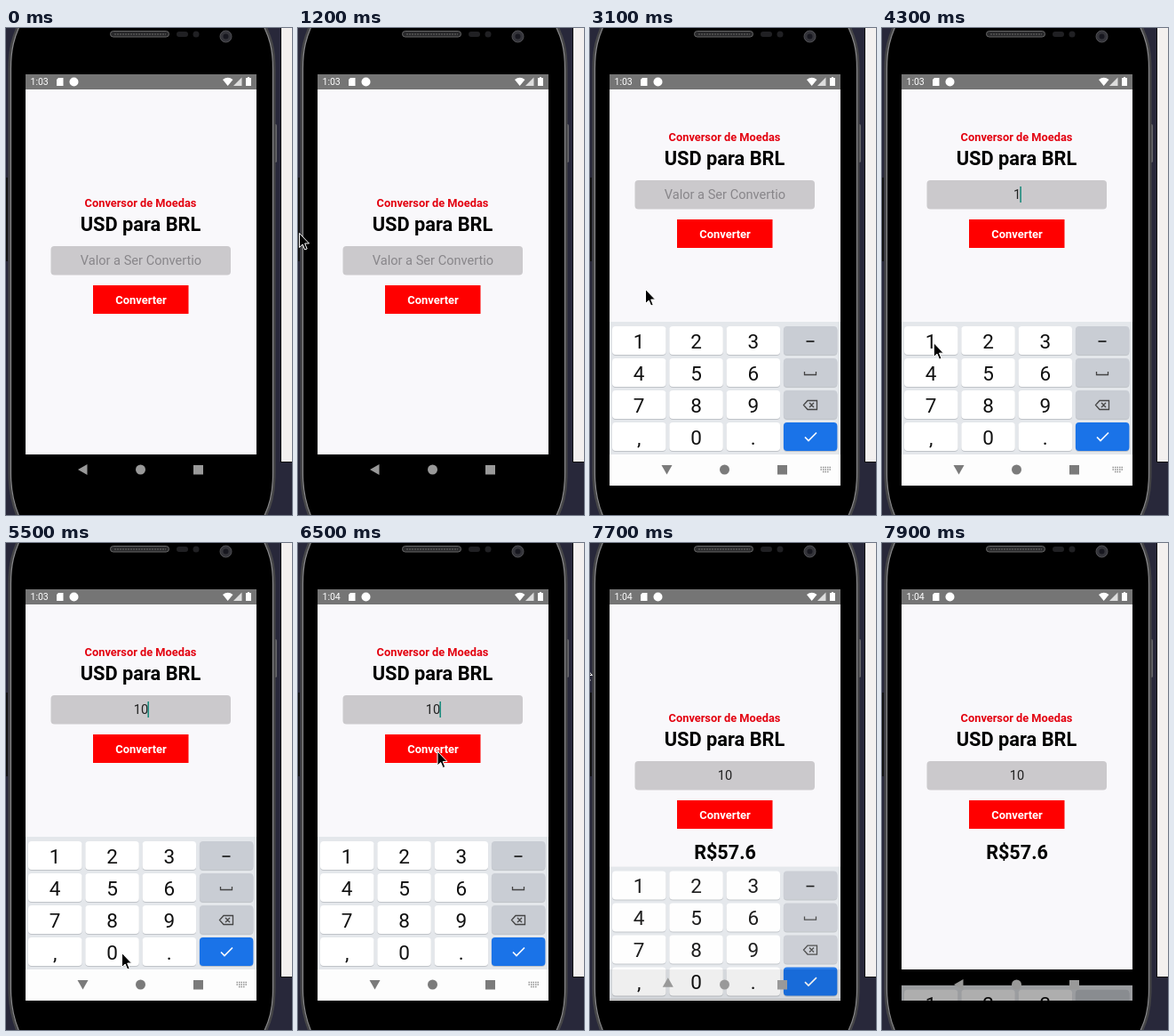
An HTML page for the animation above (8000 ms loop, 322 px wide and 547 px high).

```html
<!DOCTYPE html>
<html lang="pt">
<head>
<meta charset="utf-8">
<title>Conversor de Moedas</title>
<style>
html, body { margin: 0; width: 100%; height: 100%; overflow: hidden; background: #28283a; }
svg { display: block; width: 322px; height: 547px; font-family: Roboto, sans-serif; }
.mid text { text-anchor: middle; }
.bold { font-weight: 700; }
</style>
</head>
<body>
<svg viewBox="0 0 322 547">
  <defs>
    <clipPath id="screen"><rect x="22" y="52" width="260" height="462"/></clipPath>
    <path id="body" d="M18 -8C9 10 5.500 24 5.500 46V500C5.500 522 9 538 18 555H287C297 538 300.500 522 300.500 500V46C300.500 24 297 10 287 -8Z"/>
  </defs>

  <!-- desktop and phone -->
  <rect width="322" height="547" fill="#28283a"/>
  <rect x="309" width="13" height="488" fill="#111"/>
  <rect x="310" width="12" height="487" fill="#f3f0ef"/>
  <rect x="301" y="108" width="4" height="43" rx="1.5" fill="#66666a"/>
  <rect y="168" width="2" height="94" fill="#111"/>
  <use href="#body" fill="#000" stroke="#454547" stroke-width="6"/>
  <use href="#body" fill="#000" stroke="#88888a" stroke-width="1.200"/>
  <rect x="117.500" y="3.500" width="66" height="6.500" rx="3.200" fill="#29292b" stroke="#666"/>
  <path d="M122 7H180" stroke="#484848" stroke-width="2" stroke-dasharray="2 1"/>
  <rect x="192" y="4" width="13" height="6" rx="3" fill="#202023"/>
  <circle cx="214" cy="7" r="3.500" fill="#202023"/>
  <circle cx="247.500" cy="9.500" r="6.500" fill="#34343a" stroke="#505054"/>
  <circle cx="247.500" cy="9.500" r="3" fill="#17171f"/>

  <g clip-path="url(#screen)">
    <rect x="22" y="69" width="260" height="410" fill="#f9f8fb"/>
    <rect x="22" y="52" width="260" height="17" fill="#757575"/>
    <g fill="#fff">
      <text id="clock" x="27.500" y="64.300" font-size="10.500"></text>
      <path d="M59 56H64.500V65H57V58Z"/>
      <circle cx="76.500" cy="60.500" r="5"/>
      <path d="M244 58Q249.700 53.500 255.500 58L249.700 65Z"/>
      <path d="M265.500 55.500V65H256Z" fill="#ddd"/>
      <path d="M272 55H274V56H276V65H270V56H272Z"/>
    </g>

    <g id="form" class="mid">
      <text class="bold" x="151.500" y="200.800" font-size="12.800" fill="#e3000f">Conversor de Moedas</text>
      <text class="bold" x="151.500" y="227.700" font-size="21.800">USD para BRL</text>
      <rect x="50.500" y="245" width="202.500" height="32.500" rx="4" fill="#cbc9cc"/>
      <text id="value" x="152" y="266" font-size="14.600"></text>
      <path id="caret" d="M0 252V270" stroke="#128779" stroke-width="1.500"/>
      <g id="button">
        <rect x="98" y="289" width="107.500" height="32" fill="#f00"/>
        <text class="bold" x="152" y="310" font-size="12.900" fill="#fff">Converter</text>
      </g>
      <text id="result" class="bold" x="152" y="354.500" font-size="21.600">R$57.6</text>
    </g>

    <rect x="22" y="479" width="260" height="35"/>
    <g id="keyboard" class="mid">
      <rect x="22" y="330" width="260" height="149" fill="#e4e7eb"/>
      <rect x="22" y="479" width="260" height="35" fill="#fdfdfd"/>
      <g id="keys" font-size="22.500" fill="#111"></g>
      <g fill="none" stroke="#444" stroke-width="1.300">
        <path d="M243.500 352H252.500" stroke="#111" stroke-width="1.600"/>
        <path d="M241.500 386V389.500H254.500V386"/>
        <path d="M245 418.500H255.500V428.500H245L240.500 423.500ZM247 421L252 426M252 421L247 426"/>
        <path d="M242 459.500L246 463.500L255 454.500" stroke="#fff" stroke-width="1.700"/>
      </g>
    </g>
    <g id="nav">
      <path id="back" d="M-5.500 0L5 -6V6Z"/>
      <circle cx="151.500" cy="496" r="5.500"/>
      <rect x="211" y="491" width="11" height="10.500"/>
      <path id="switcher" d="M259.500 493.500H271.500M259.500 496H271.500M262 498.500H269" fill="none"
        stroke="#909090" stroke-width="1.500" stroke-dasharray="1.500 1"/>
    </g>
  </g>
  <path id="pointer" d="M0.500 0.500V16.500L4.200 13L6.700 19L9.200 18L6.700 12H11.500Z" fill="#000" stroke="#fff"/>
</svg>

<script>
const LOOP = 8000, STEP = 100;
const FOCUS = 2400, TYPE_1 = 3900, TYPE_0 = 5300, PRESS = 6900, RESULT = 7600;
const $ = id => document.getElementById(id);
const set = (id, attrs) => Object.entries(attrs).forEach(([k, v]) => $(id).setAttribute(k, v));
const ramp = (t, from, to) => Math.min(1, Math.max(0, (t - from) / (to - from)));
const smooth = p => p < 0.5 ? 4 * p ** 3 : 1 - 4 * (1 - p) ** 3;
const keys = {};

// number pad: three white columns and one function column
['123', '456', '789', ',0.'].forEach((row, r) => {
  [...row, ''].forEach((label, c) => {
    const x = 25 + c * 64.3, y = 335 + r * 36;
    const fill = label ? '#fff' : r < 3 ? '#c9cdd4' : '#1a73e8';
    $('keys').insertAdjacentHTML('beforeend',
      `<rect x="${x}" y="${y + 1}" width="60.500" height="32" rx="4" fill="#bfc3c8"/>
       <rect x="${x}" y="${y}" width="60.500" height="32" rx="4" fill="${fill}"/>
       <text x="${x + 30.2}" y="${y + 24.5}">${label}</text>`);
    if (label) keys[label] = $('keys').lastElementChild.previousElementSibling;
  });
});

// pointer glides, one after another
const glides = [
  { from: 1000, to: 1400, x: 106, y: 257 },
  { from: 2500, to: 2900, x: 62, y: 293 },
  { from: 3100, to: 3400, x: 53, y: 346 },
  { from: 4100, to: 4900, x: 130, y: 460 },
  { from: 5800, to: 6300, x: 156.5, y: 233.5 },
  { from: 7400, to: 7800, x: -20, y: 130 }
];

function pointerAt(t) {
  let x = -104, y = 203;
  for (const g of glides) {
    const p = smooth(ramp(t, g.from, g.to));
    x += (g.x - x) * p;
    y += (g.y - y) * p;
  }
  return [x, y];
}

function caretOn(t) {
  const since = t - (t < TYPE_1 ? FOCUS : t < TYPE_0 ? TYPE_1 : TYPE_0);
  return t >= FOCUS && t < PRESS && since % 1000 < 500;
}

function pressKey(label, t, from) {
  keys[label].setAttribute('fill', t >= from && t < from + 300 ? '#d0d3d8' : '#fff');
}

function draw(t) {
  const typed = '10'.slice(0, (t >= TYPE_1) + (t >= TYPE_0));
  const raised = t >= FOCUS && t < RESULT;
  const shown = smooth(ramp(t, FOCUS, 2900)) - smooth(ramp(t, 7500, 8060));
  const turn = 270 * ramp(t, 2350, 2850) + 90 * ramp(t, 7500, 7800);

  $('clock').textContent = t < 6500 ? '1:03' : '1:04';
  $('value').textContent = typed || 'Valor a Ser Convertio';
  set('value', { fill: typed ? '#222' : '#88868a' });
  set('form', { transform: `translate(0 ${raised ? -74 : 0})` });
  set('caret', { transform: `translate(${152 + typed.length * 4.1} 0)`, opacity: +caretOn(t) });
  set('button', { 'fill-opacity': 1 - 0.51 * Math.sin(Math.PI * ramp(t, PRESS, PRESS + 400)) });
  set('result', { opacity: +(t >= RESULT) });

  pressKey('1', t, 3700);
  pressKey('0', t, 5200);
  set('keyboard', { transform: `translate(0 ${184 * (1 - shown)})`, opacity: 0.65 + 0.35 * shown });
  set('back', { transform: `translate(86.500 496) rotate(${turn})` });
  set('nav', { fill: raised ? '#7b7b7b' : '#999' });
  set('switcher', { opacity: +raised });
  set('pointer', { transform: `translate(${pointerAt(t)})` });
}

const start = performance.now();
function tick() {
  const t = (performance.now() - start) % LOOP;
  draw(Math.floor(t / STEP) * STEP);
  requestAnimationFrame(tick);
}
tick();
</script>
</body>
</html>
```
